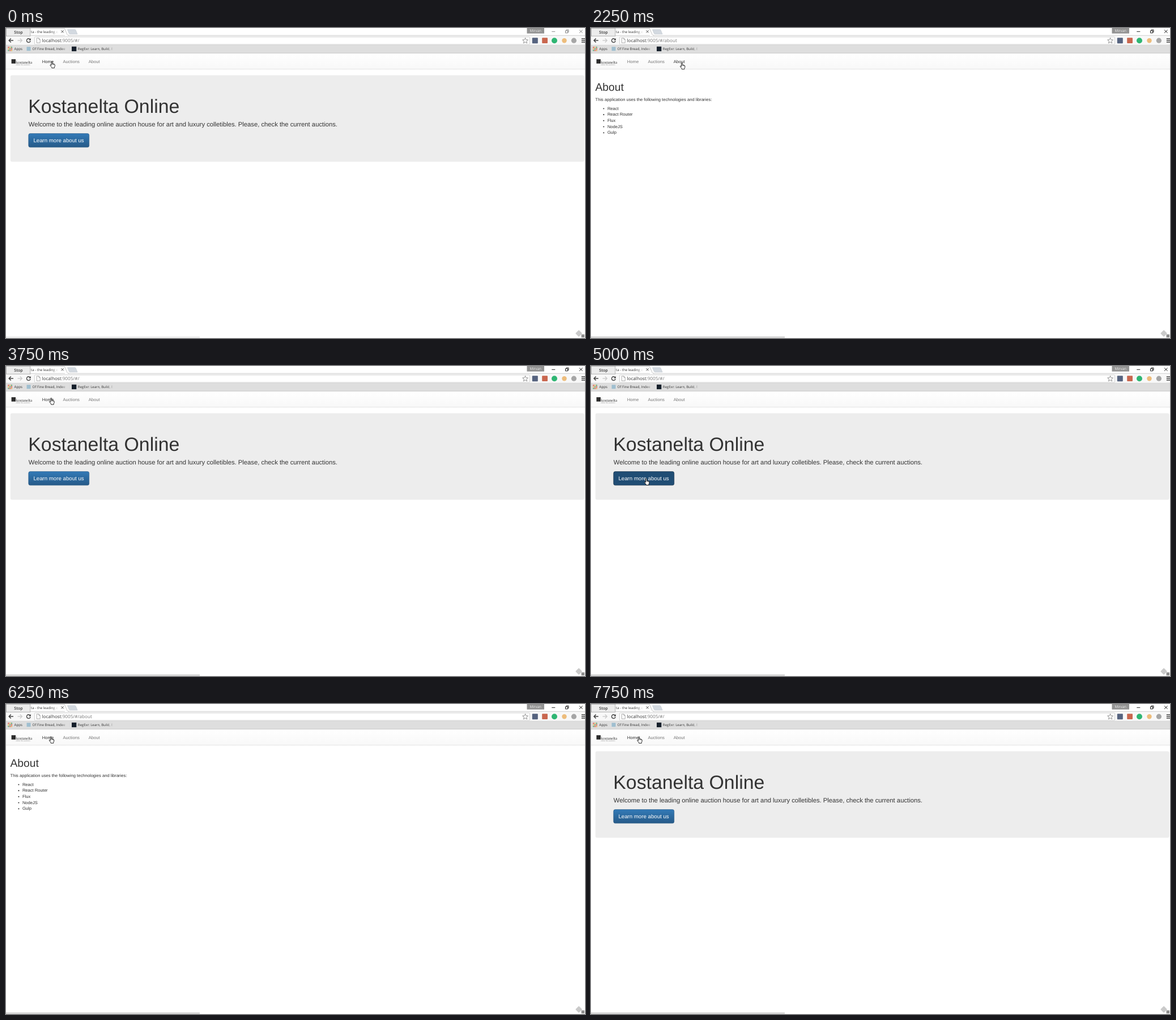
An HTML page that plays this animation: 1022 by 548 pixels, repeating every 8 s.

```html
<!DOCTYPE html>
<html lang="en">
<head>
<meta charset="utf-8">
<title>Auction site walkthrough</title>
<style>
  html, body { margin: 0; width: 100%; height: 100%; overflow: hidden; background: #fff; }
  svg { display: block; width: 1022px; height: 548px; text-rendering: geometricPrecision; }
  text { font-family: "Liberation Sans", Arial, sans-serif; white-space: pre; }
  .ui { font-family: "Open Sans", sans-serif; }
  .serif { font-family: "Liberation Serif", serif; }
</style>
</head>
<body>
<svg id="stage" viewBox="0 0 1022 548" xmlns="http://www.w3.org/2000/svg"></svg>
<script>
const LOOP = 8000;

// time, pointer shape, left, top, highlighted links
const steps = [
  [0, "hand", 77.5, 58.4, "Home"],
  [750, "hand", 91.5, 58.7, "Home"],
  [1000, "hand", 109.2, 59, "Auctions"],
  [1250, "hand", 112.8, 59, "Auctions"],
  [1500, "hand", 159.5, 61, "About"],
  [2000, "arrow", 156.8, 60.4, "About"],
  [2250, "hand", 157, 60.5, "About"],
  [2750, "hand", 148.5, 59, "About"],
  [3000, "hand", 109.7, 55.2, "Auctions About"],
  [3250, "hand", 90.5, 54.5, "Auctions About"],
  [3500, "hand", 76.5, 59, "Home About"],
  [3750, "hand", 76.3, 55.8, "Home"],
  [4250, "beam", 99, 141, "Home"],
  [4500, "hand", 94.5, 201, "Home"],
  [5000, "hand", 94, 198.2, ""],
  [5250, "arrow", 94.3, 198, ""],
  [5500, "arrow", 94.3, 176.3, ""],
  [5750, "arrow", 94.3, 74, ""],
  [6000, "hand", 95, 60, "Auctions"],
  [6250, "hand", 75.9, 56.9, "Home"],
  [7500, "hand", 70.5, 59, "Home"],
  [7750, "hand", 81.3, 57, "Home"]
];
const pages = [[0, "home"], [2250, "about"], [3750, "home"], [5250, "about"], [6750, "home"]];
const buttonLooks = [
  [0, "url(#blue)", "#245580"], [4500, "#265a88", "#245580"],
  [5000, "#204d74", "#122b40"], [5250, "url(#blue)", "#245580"]
];

const text = (x, y, size, str, fill = "#333", extra = "") =>
  `<text x="${x}" y="${y}" font-size="${size}" fill="${fill}" ${extra}>${str}</text>`;
const ui = (x, y, size, str, fill = "#333", extra = "") =>
  text(x, y, size, str, fill, `class="ui" ${extra}`);
const rect = (x, y, w, h, fill, extra = "") =>
  `<rect x="${x}" y="${y}" width="${w}" height="${h}" fill="${fill}" ${extra}/>`;
const line = (d, stroke, width = 1, extra = "") =>
  `<path d="${d}" fill="none" stroke="${stroke}" stroke-width="${width}" ${extra}/>`;
const dot = (x, y, r, fill) => `<circle cx="${x}" cy="${y}" r="${r}" fill="${fill}"/>`;

const shade = (id, top, bottom) =>
  `<linearGradient id="${id}" x1="0" y1="0" x2="0" y2="1">
    <stop stop-color="${top}"/><stop offset="1" stop-color="${bottom}"/></linearGradient>`;
const fade = (id, from, to) =>
  `<linearGradient id="${id}" gradientUnits="userSpaceOnUse" x1="${from}" y1="0" x2="${to}" y2="0">
    <stop stop-color="#333"/><stop offset="1" stop-color="#333" stop-opacity="0"/></linearGradient>`;

const defs = `<defs>
  ${shade("blue", "#337ab7", "#265a88")}${shade("bar", "#fff", "#f8f8f8")}
  ${fade("fadeTab", 80, 93)}${fade("fadeOne", 97, 108)}${fade("fadeTwo", 179, 190)}
</defs>`;

function appsGrid() {
  const hues = ["#db4437", "#e8a33d", "#4a9c5d"];
  let out = "";
  for (let i = 0; i < 9; i++) {
    out += rect(3.4 + (i % 3) * 2.8, 33.2 + Math.floor(i / 3) * 2.8, 1.9, 1.9, hues[(i + Math.floor(i / 3)) % 3]);
  }
  return out;
}

const browser = `
  ${rect(0, 0, 1022, 13, "#fff")}
  ${rect(0, 13, 1022, 17, "#f8f8f8")}
  ${line("M0 13.2H104M110 13.2H1022", "#c4c4c4", .8)}
  ${line("M43 .3H101.5Q103 .3 103.8 2L108 11.5Q108.8 13.2 111 13.2", "#b5b5b5", .8)}
  ${ui(44, 8.7, 6.15, "ta - the leading o", "url(#fadeTab)")}
  ${line("M97.5 4.2L101.7 8.4M101.7 4.2L97.5 8.4", "#444", 1)}
  <path d="M108.5 2.8H121.5Q122.7 2.8 123.2 4L126 10.8H113Q111.8 10.8 111.3 9.6Z" fill="#d3d9e0" stroke="#bcc3ca" stroke-width=".6"/>
  ${rect(.4, .4, 42.4, 13.8, "#ececec", 'stroke="#a5a5a5" stroke-width=".8"')}
  ${text(14.3, 9.8, 7, "Stop", "#333", 'class="ui" font-weight="600"')}
  ${rect(919.5, 0, 30.5, 9.7, "#939393")}
  ${ui(934.7, 6.9, 6.3, "Mirvan", "#eee", 'text-anchor="middle"')}
  <g id="controls" fill="none" stroke="#888" stroke-width="1">
    <path d="M963.3 6.3H969.3M987.5 4.8H991.5V8.8H987.5ZM989 4.5V3.2H993V7.3H991.8M1012 3.3L1017.6 8.9M1017.6 3.3L1012 8.9"/>
  </g>
  ${line("M5.2 22H13M8.7 18.4L5.2 22L8.7 25.6", "#444", 1.5)}
  ${line("M20.5 22H28.3M24.8 18.4L28.3 22L24.8 25.6", "#ccc", 1.4)}
  ${line("M42.6 20A3.4 3.4 0 1 0 43.2 23", "#444", 1.4)}
  <path d="M43.8 18V21.7H40.1Z" fill="#444"/>
  ${rect(50.4, 15.8, 874, 13.2, "#fff", 'rx="1" stroke="#c8c8c8" stroke-width=".8"')}
  <path d="M54.2 18H58L60.2 20.2V26.2H54.2ZM58 18V20.2H60.2" fill="#fff" stroke="#888" stroke-width=".7"/>
  <text class="ui" x="63.5" y="25" font-size="8.15" fill="#333">localhost<tspan id="path" fill="#777"></tspan></text>
  <path d="M916.6 17.4L918 20.7L921.5 21L918.8 23.3L919.7 26.8L916.6 24.9L913.5 26.8L914.4 23.3L911.7 21L915.2 20.7Z" fill="#fff" stroke="#777" stroke-width=".8"/>
  ${rect(928.8, 17.2, 10, 10, "#56637f", 'rx="1"')}
  ${rect(946.2, 17.2, 9.8, 9.8, "#c9674f", 'rx="1"')}
  ${dot(968, 22.2, 5, "#2fb673")}
  ${dot(985.5, 22.2, 4.2, "#edbd7c")}
  ${dot(1002.4, 22.2, 4.6, "#a6a6a6")}
  ${line("M1015.8 19H1022M1015.8 22H1022M1015.8 25H1022", "#444", 1.5)}
  ${rect(0, 30, 1022, 15, "#dedede")}
  ${line("M0 30.2H1022", "#cfcfcf", .6)}
  ${line("M0 44.7H1022", "#c2c2c2", .8)}
  ${appsGrid()}
  ${ui(14.5, 39.2, 6.2, "Apps")}
  ${rect(36.5, 33.3, 7, 7, "#9fbfd0")}
  ${ui(46.5, 39.2, 6.15, "Of Fine Bread, Indee", "url(#fadeOne)")}
  ${rect(116, 32.8, 8.3, 8.3, "#16202b")}
  ${ui(126.8, 39.2, 6, "RegExr: Learn, Build, E", "url(#fadeTwo)")}`;

const navbar = `
  ${rect(0, 45, 1022, 27.5, "url(#bar)")}
  ${line("M0 72.5H1022", "#e5e5e5", .8)}
  ${line("M0 73.4H1022", "#f6f6f6", 1)}
  ${rect(9.6, 55.2, 7.4, 7.6, "#2b2b2b")}
  ${text(17.8, 63.3, 7, "kostanelta", "#333", 'class="serif"')}
  ${text(17, 66.4, 3, "online fine auctions", "#888")}
  ${[["Home", 63.8], ["Auctions", 100.4], ["About", 145.7]].map(([name, x]) =>
    text(x, 61.6, 7.65, name, "#777", `data-link="${name}"`)).join("")}`;

const home = `<g id="home">
  ${rect(7.8, 83.5, 1012.8, 153, "#ededed", 'rx="3.2"')}
  ${text(39.3, 150, 33.83, "Kostanelta Online")}
  ${text(39.8, 174, 11.26, "Welcome to the leading online auction house for art and luxury colletibles. Please, check the current auctions.")}
  ${rect(39.8, 186.6, 106.9, 24.2, "url(#blue)", 'id="button" rx="3" stroke="#245580" stroke-width=".6"')}
  ${text(48.4, 202, 9.69, "Learn more about us", "#fff")}
</g>`;

const about = `<g id="about">
  ${text(7.5, 111.3, 19.3, "About")}
  ${text(7.5, 128.7, 7.62, "This application uses the following technologies and libraries:")}
  ${["React", "React Router", "Flux", "NodeJS", "Gulp"].map((name, i) =>
    dot(22.4, 142.5 + i * 10.67, 1.05, "#333") + text(28.9, 144.8 + i * 10.67, 7.6, name)).join("")}
</g>`;

const corner = `
  ${rect(0, 545, 342, 3, "#d9d9d9", 'id="status"')}
  ${rect(1006.8, 535.6, 8.6, 8.6, "#cacaca", 'rx="1" transform="rotate(45 1011.1 539.9)"')}
  ${rect(1015.6, 541.6, 5.4, 5.4, "#8c8c8c")}`;

const pointers = `
  <g id="hand" fill="#fff" stroke="#111" stroke-width=".9" stroke-linejoin="round">
    <path d="M2.5 1.2Q3.4 0 4.3 1.2V4.6L6 4.9L7.5 5.4Q8.8 5.8 8.8 7.1V9L7.9 10.7V12.3H3.3V11.3L.6 7.9Q.1 6.7 1.2 6.5L2.5 7.7Z"/>
    <path d="M4.3 4.6V6.6M5.9 4.9V6.8M7.4 5.4V7" stroke-width=".6"/>
  </g>
  <path id="arrow" d="M.4 .4V8.8L2.3 7.1L3.6 10.2L5 9.6L3.7 6.6H6.2Z" fill="#fff" stroke="#111" stroke-width=".8" stroke-linejoin="round"/>
  <path id="beam" d="M0 .4H1.5L2 .8L2.5 .4H4M2 .8V8.6M0 9H1.5L2 8.6L2.5 9H4" fill="none" stroke="#222" stroke-width=".8"/>`;

const stage = document.getElementById("stage");
stage.innerHTML = defs + rect(0, 0, 1022, 548, "#fff") + browser + navbar + home + about + corner + pointers;

const el = id => document.getElementById(id);
const links = [...stage.querySelectorAll("[data-link]")];
const at = (list, t) => list.filter(entry => entry[0] <= t).pop();
const show = (id, on) => el(id).setAttribute("visibility", on ? "visible" : "hidden");

function draw(t) {
  const [, shape, x, y, dark] = at(steps, t);
  const [, page] = at(pages, t);
  const [, fill, border] = at(buttonLooks, t);
  for (const id of ["home", "about"]) show(id, id === page);
  for (const id of ["hand", "arrow", "beam"]) show(id, id === shape);
  el(shape).setAttribute("transform", `translate(${x} ${y})`);
  for (const link of links) {
    link.setAttribute("fill", dark.includes(link.dataset.link) ? "#333" : "#777");
  }
  el("path").textContent = ":9005/#/" + (page === "about" ? "about" : "");
  el("button").setAttribute("fill", fill);
  el("button").setAttribute("stroke", border);
  el("status").setAttribute("fill", t < 250 ? "#efefef" : "#d9d9d9");
  el("controls").setAttribute("stroke", t < 2000 ? "#888" : "#222");
}

const start = performance.now();
function tick() {
  draw((performance.now() - start) % LOOP);
  requestAnimationFrame(tick);
}
draw(0);
requestAnimationFrame(tick);
</script>
</body>
</html>
```
